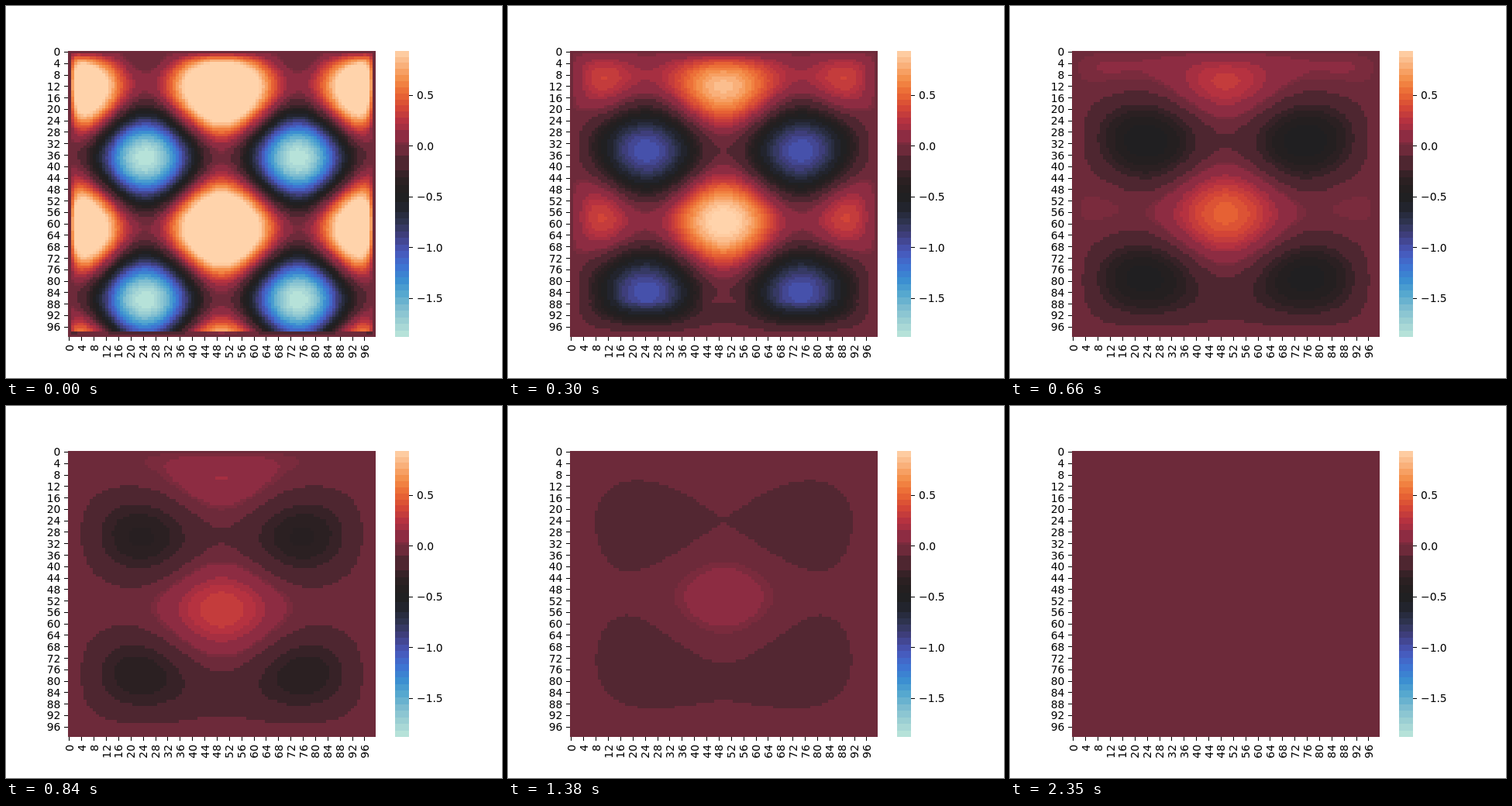
An HTML page with a canvas for the animation above (8 s loop, 640 by 480 pixels).

```html
<!DOCTYPE html>
<html lang="en">
<head>
<meta charset="utf-8">
<title>Heat map relaxation</title>
<style>
  html, body { margin: 0; width: 100%; height: 100%; overflow: hidden; background: #fff; }
  canvas, svg { position: absolute; left: 0; top: 0; width: 640px; height: 480px; }
  text { font: 13.89px "DejaVu Sans", Verdana, sans-serif; fill: #000; }
</style>
</head>
<body>
<canvas id="map" width="640" height="480"></canvas>
<svg id="axes" viewBox="0 0 640 480"></svg>
<script>
const N = 100, OMEGA = 1.24, STEP_MS = 30, LOOP_MS = 8000;
const LAST_STEP = 60, SETTLE_MS = 1650, TAIL_MS = 1800, FLAT_MS = 2350;
const LEFT = 80, TOP = 57.6, WIDTH = 396.8, HEIGHT = 369.6;
const V_MIN = -1.8807, V_MAX = 0.9403;
const ctx = document.getElementById("map").getContext("2d");
const axes = document.getElementById("axes");

// Colour ramp, evenly spaced from V_MIN to V_MAX
const RAMP = ("bde7db a0d2d4 80bed0 56a8cf 3a8dd1 3f71d2 4856b8 414082 2f3450 22252e 1f1e1e " +
  "2c2023 48252e 692a39 8c2c42 b23041 d44637 ea6733 f48e49 f9b27d ffd3ab").split(" ")
  .map(h => [0, 2, 4].map(i => parseInt(h.substr(i, 2), 16)));

function ramp(value) {
  const pos = Math.min(1, Math.max(0, (value - V_MIN) / (V_MAX - V_MIN))) * (RAMP.length - 1);
  const i = Math.min(RAMP.length - 2, Math.floor(pos));
  const rgb = RAMP[i].map((c, k) => Math.round(c + (RAMP[i + 1][k] - c) * (pos - i)));
  return `rgb(${rgb})`;
}

// Limits of the colour bands, ascending
function bandEdges() {
  const low = [-0.092, -0.237, -0.31, -0.38, -0.46, -0.55, -0.65];
  const high = [0.01, 0.035];
  for (let v = -0.71; v > V_MIN + 0.03; v -= 0.065) low.push(v);
  for (let v = 0.16; v < V_MAX - 0.03; v += 0.06) high.push(v);
  return [-9, V_MIN, ...low.reverse(), ...high, V_MAX, 9];
}
const EDGES = bandEdges();
const ZERO_COLOR = ramp(-0.03);

function bandOf(value) {
  let b = 0;
  while (b < EDGES.length - 2 && value >= EDGES[b + 1]) b++;
  return b;
}

// The lowest band in use takes the colour of the values it really holds
function bandColor(b, min) {
  if (EDGES[b] < 0 && EDGES[b + 1] > 0) return ZERO_COLOR;
  return ramp((Math.max(EDGES[b], min) + EDGES[b + 1]) / 2);
}

function startGrid() {
  const k = 4 * Math.PI / (N - 1), u = new Float64Array(N * N);
  for (let i = 1; i < N - 1; i++)
    for (let j = 1; j < N - 1; j++) u[i * N + j] = Math.cos(k * j) + Math.sin(k * i);
  return u;
}

// One line over-relaxation sweep from top to bottom; each row is a tridiagonal solve
function relax(u) {
  const c = new Float64Array(N), d = new Float64Array(N);
  for (let i = 1; i < N - 1; i++) {
    const row = i * N;
    for (let j = 1; j < N - 1; j++) {
      const rhs = 4 * (1 - OMEGA) * u[row + j] + OMEGA * (u[row - N + j] + u[row + N + j]);
      const pivot = 4 - OMEGA * c[j - 1];
      c[j] = OMEGA / pivot;
      d[j] = (rhs + OMEGA * d[j - 1]) / pivot;
    }
    for (let j = N - 2; j > 0; j--) u[row + j] = d[j] + c[j] * u[row + j + 1];
  }
}

function simulate() {
  const u = startGrid(), states = [];
  for (let s = 0; s <= LAST_STEP; s++) {
    relax(u);
    states.push(u.slice());
  }
  return states;
}
const STATES = simulate();

const cellX = j => Math.round(LEFT + j * WIDTH / N);
const cellY = i => Math.round(TOP + i * HEIGHT / N);

function drawMap(u) {
  ctx.fillStyle = ZERO_COLOR;
  ctx.fillRect(LEFT, cellY(0), cellX(N) - LEFT, cellY(N) - cellY(0));
  if (!u) return;
  const min = Math.min(...u);
  const colors = EDGES.slice(1).map((_, b) => bandColor(b, min));
  for (let i = 0; i < N; i++) {
    for (let j = 0; j < N;) {
      const band = bandOf(u[i * N + j]), from = j;
      while (j < N && bandOf(u[i * N + j]) === band) j++;
      ctx.fillStyle = colors[band];
      ctx.fillRect(cellX(from), cellY(i), cellX(j) - cellX(from), cellY(i + 1) - cellY(i));
    }
  }
}

const barY = v => TOP + (V_MAX - v) / (V_MAX - V_MIN) * HEIGHT;

function drawBar() {
  for (let b = 1; b < EDGES.length - 2; b++) {
    const y = Math.round(barY(EDGES[b + 1]));
    ctx.fillStyle = bandColor(b, V_MIN);
    ctx.fillRect(502, y, 18, Math.round(barY(EDGES[b])) - y);
  }
}

function add(tag, attrs, content = "") {
  const el = document.createElementNS("http://www.w3.org/2000/svg", tag);
  for (const key in attrs) el.setAttribute(key, attrs[key]);
  el.textContent = content;
  axes.append(el);
}
const tick = (x, y, width, height) =>
  add("rect", { x, y, width, height, "shape-rendering": "crispEdges" });

function drawAxes() {
  for (let n = 0; n < N; n += 4) {
    const x = LEFT + (n + 0.5) * WIDTH / N, y = TOP + (n + 0.5) * HEIGHT / N;
    tick(75, Math.floor(y), 5, 1);
    add("text", { x: 70.3, y: Math.round(y) + 5, "text-anchor": "end" }, n);
    tick(Math.floor(x), 427, 1, 5);
    add("text", { transform: `translate(${Math.round(x) + 5} 437) rotate(-90)`, "text-anchor": "end" }, n);
  }
  for (let v = -1.5; v <= 0.5; v += 0.5) {
    const y = barY(v);
    tick(520, Math.floor(y), 5, 1);
    add("text", { x: 530, y: Math.round(y) + 5 }, v.toFixed(1).replace("-", "\u2212"));
  }
}

function stepAt(t) {
  if (t >= FLAT_MS) return -1;
  if (t >= TAIL_MS) return LAST_STEP;
  if (t >= SETTLE_MS) return LAST_STEP - 1;
  return Math.floor(t / STEP_MS);
}

let shown = null;
function render(t) {
  const step = stepAt(t);
  if (step === shown) return;
  shown = step;
  drawMap(STATES[step]);
}

drawBar();
drawAxes();
render(0);
const start = performance.now();
function loop() {
  render((performance.now() - start) % LOOP_MS);
  requestAnimationFrame(loop);
}
requestAnimationFrame(loop);
</script>
</body>
</html>
```
